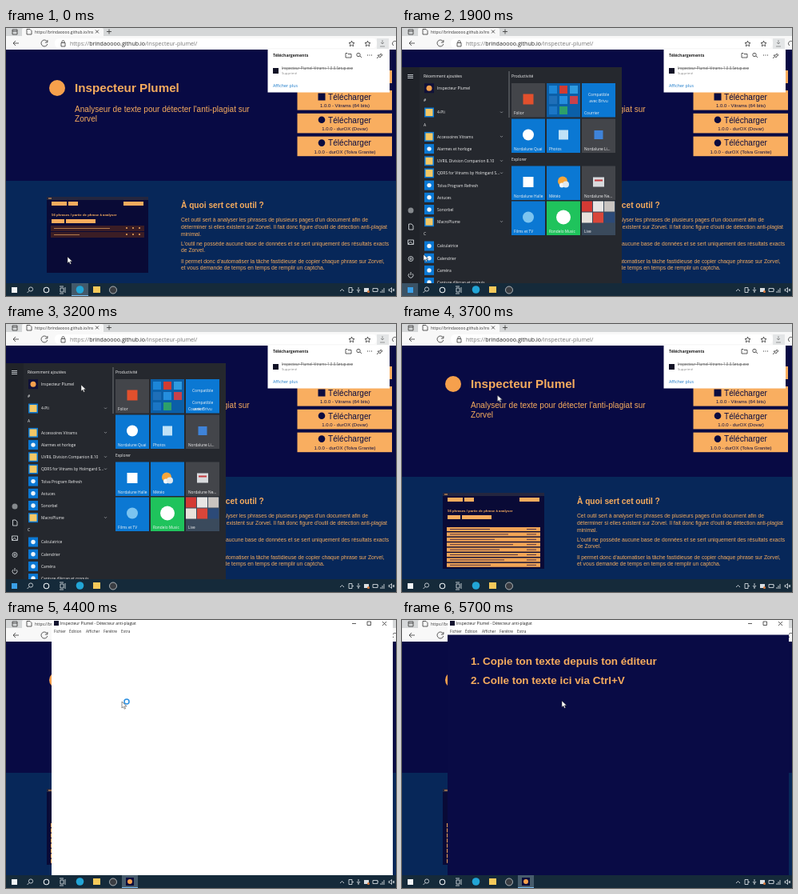
Animation, 488 px wide and 335 px high, one loop 5800 ms. Source, as an HTML page:

```html
<!DOCTYPE html>
<html lang="fr">
<head>
<meta charset="utf-8">
<title>Inspecteur Plumel</title>
<style>
html, body { margin: 0; width: 100%; height: 100%; overflow: hidden; background: #080a44; }
svg { display: block; width: 100vw; height: 100vh; }
text { font: 4.9px "Open Sans", "Noto Sans", sans-serif; white-space: pre; }
.web text { font-family: "Liberation Sans", Arial, sans-serif; fill: #f6ac5e; }
.web .dark { fill: #0b0c40; }
.bold { font-weight: 700; }
.line { fill: none; stroke: #333; stroke-width: .8; }
.pale { fill: none; stroke: #e8edf0; stroke-width: .8; }
.white text { fill: #f4f4f4; }

/* The small lead keeps each change just before its 100 ms tick. */
.anim { animation: 5800ms step-end -20ms infinite; }

#cursor { animation-name: move; }
@keyframes move {
  0%     { transform: translate(77px, 286px); }
  3.45%  { transform: translate(77px, 286px); animation-timing-function: steps(8); }
  17.24% { transform: translate(13px, 326px); }
  31.03% { transform: translate(13px, 326px); animation-timing-function: steps(6); }
  41.38% { transform: translate(96px, 68px); }
  43.1%  { transform: translate(96px, 68px); animation-timing-function: steps(6); }
  53.45% { transform: translate(94px, 76px); }
  58.62% { transform: translate(94px, 76px); animation-timing-function: steps(6); }
  68.97% { transform: translate(145px, 102px); }
  87.93% { transform: translate(145px, 102px); animation-timing-function: steps(5); }
  96.55%, 100% { transform: translate(200px, 101px); }
}

#menu { animation-name: menu; }
@keyframes menu {
  0%     { opacity: 0; transform: translateY(24px); }
  24.14% { opacity: 0; transform: translateY(24px); animation-timing-function: steps(3); }
  29.31% { opacity: 1; transform: none; }
  60.34% { opacity: 1; transform: none; animation-timing-function: steps(2); }
  63.79%, 100% { opacity: 0; transform: none; }
}

#app { animation-name: open; transform-origin: 270.5px 157px; }
@keyframes open {
  0%     { opacity: 0; transform: scale(.975); }
  72.41% { opacity: .53; transform: scale(.975); }
  74.14% { opacity: .85; transform: scale(.99); }
  75.86%, 100% { opacity: 1; transform: none; }
}

#startHover { animation-name: startHover; }
@keyframes startHover { 0% { opacity: 0 } 15.52% { opacity: 1 } 48.28%, 100% { opacity: 0 } }
#startBlue { animation-name: startBlue; }
@keyframes startBlue { 0% { opacity: 0 } 15.52% { opacity: 1 } 62.07%, 100% { opacity: 0 } }
#tabTask { animation-name: tabTask; }
@keyframes tabTask { 0% { opacity: 1 } 25.86%, 100% { opacity: 0 } }
#appTask { animation-name: appTask; }
@keyframes appTask { 0% { opacity: 0 } 74.14%, 100% { opacity: 1 } }
#rowHover { animation-name: rowHover; }
@keyframes rowHover { 0% { opacity: 0 } 39.66% { opacity: 1 } 48.28%, 100% { opacity: 0 } }
#busy { animation-name: busy; }
@keyframes busy { 0% { opacity: 0 } 65.52% { opacity: 1 } 77.59%, 100% { opacity: 0 } }
#demoRows { animation-name: demoRows; }
@keyframes demoRows { 0% { opacity: 0 } 34.48%, 100% { opacity: 1 } }
#body { animation-name: body; }
@keyframes body { 0% { opacity: 0 } 77.59%, 100% { opacity: 1 } }
#steps { animation-name: guide; }
@keyframes guide { 0% { opacity: 0 } 91.38%, 100% { opacity: 1 } }
#mailOld { animation-name: mailOld; }
@keyframes mailOld { 0% { opacity: 1 } 53.45% { opacity: 0 } 56.9%, 100% { opacity: 1 } }
#mailNew { animation-name: mailNew; }
@keyframes mailNew {
  0%     { opacity: 0; transform: translateY(30px); }
  53.45% { opacity: 1; transform: translateY(30px); }
  55.17% { opacity: 1; transform: translateY(15px); }
  56.9%, 100% { opacity: 0; transform: none; }
}
</style>
</head>
<body>
<svg viewBox="0 0 488 335" preserveAspectRatio="none">
  <defs>
    <clipPath id="mailClip"><path d="M225 69h42v42h-42z"/></clipPath>
    <path id="star" class="line" d="M0-3.500l1 2.400 2.500.2-1.900 1.700.6 2.500L0 2l-2.200 1.300.6-2.500-1.900-1.700 2.500-.2z"/>
  </defs>

  <!-- web page -->
  <g class="web">
    <path fill="#080a44" d="M0 27h488v164H0z"/>
    <path fill="#072759" d="M0 191h488v128H0z"/>
    <circle cx="64" cy="75" r="10" fill="#f6a04c"/>
    <text class="bold" x="86" y="80" style="font-size:15.2px">Inspecteur Plumel</text>
    <g id="intro"></g>
    <g id="buttons"></g>
    <text class="bold" x="219" y="225" style="font-size:10.17px">À quoi sert cet outil ?</text>
    <g id="about"></g>
    <g id="demo">
      <path fill="#090a36" d="M51 211h127v95H51z"/>
      <path fill="#24263f" d="M51 211h127v4H51z"/>
      <path fill="#f6ac5e" d="M53 212.5h4v1h-4zM57 217h19v5H57zM78 217h12v5H78zM147 217h25v5h-25zM57 239h16v5H57zM75 239h37v5H75z"/>
      <text class="bold" x="57" y="235.3" style="font-size:4.3px">56 phrases / partie de phrase à analyser</text>
      <path fill="#3b1d25" d="M56 247h117v7H56zM56 255h117v7H56z"/>
      <g id="demoLines"></g>
      <g id="demoRows" class="anim"></g>
    </g>
  </g>

  <!-- browser frame -->
  <path fill="#d5d7d8" d="M0 0h488v11H0z"/>
  <path fill="#f8f8f8" d="M20 11V2q0-2 2-2h98q2 0 2 2v9zM0 10h488v17H0z"/>
  <path fill="#fff" d="M66 13h393q5 0 5 6t-5 6H66q-5 0-5-6t5-6z"/>
  <path class="line" d="M8 2h6v6H8zM8 4h6M26 1.500h4l2 2V8h-6zM112 2.500l4 4m0-4l-4 4M126 4.500h6m-3-3v6"/>
  <path class="line" d="M16 19H9l3-3m-3 3l3 3M51.500 17a4 4 0 1 0 .4 3m0-5v3h-3M69 18.500h5V23h-5zM70 18v-1.500q1.500-2 3 0V18"/>
  <path class="line" d="M471 15v5m-2-2l2 2 2-2M468 23h6M485 22a3 3 0 1 1 3 0"/>
  <use href="#star" x="432.500" y="19.500"/>
  <use href="#star" x="452.500" y="19.500"/>
  <path fill="#cfd3d6" opacity=".5" d="M464 13h15v13h-15z"/>
  <text x="36" y="6.800" style="font-size:4.900px" fill="#333">https://brindaoooo.github.io/ins</text>
  <text x="80" y="21.600" style="font-size:7.100px" fill="#777">https://<tspan fill="#222">brindaoooo.github.io</tspan>/inspecteur-plumel/</text>

  <!-- downloads -->
  <path fill="#fff" d="M327.500 26.500h152.500v54h-152.500z"/>
  <text class="bold" x="334" y="36" style="font-size:5.200px" fill="#222">Téléchargements</text>
  <path class="line" d="M425 31.500h2l1 1h4v4.500h-7zM443 35l2 2M466 36l-2 2m1-4l3 3 1-2 2-1-2-2-1 2z"/>
  <circle class="line" cx="441" cy="33.500" r="2.200"/>
  <path fill="#333" d="M452 33.500h1v1h-1zM454.500 33.500h1v1h-1zM457 33.500h1v1h-1z"/>
  <path fill="#111226" d="M334 50h7v7h-7z"/>
  <text x="345" y="52" style="font-size:4.500px;text-decoration:line-through" fill="#555">Inspecteur-Plumel-Vitrams-1.0.0.Setup.exe</text>
  <text x="345" y="58" style="font-size:4.200px" fill="#888">Supprimé</text>
  <text x="334" y="74" style="font-size:5.300px" fill="#1878c8">Afficher plus</text>

  <!-- start menu -->
  <g id="menu" class="anim white">
    <path fill="#25282e" d="M0 49h275v270H0z"/>
    <path fill="#202329" d="M0 49h22v270H0z"/>
    <path id="rowHover" class="anim" fill="#4a4c50" d="M25 53h106v14H25z"/>
    <path class="pale" d="M7 58.500h7M7 60.500h7M7 62.500h7M8.500 245h3.500l2 2v5H8.500zM7.500 265h7v5.500h-7zM8 270l2.500-3 3 3"/>
    <circle cx="11" cy="228" r="3.500" fill="#85898d"/>
    <circle class="pale" cx="11" cy="288.500" r="3"/><circle class="pale" cx="11" cy="288.500" r="1"/>
    <path class="pale" d="M9 307a3 3 0 1 0 4 0M11 305v4"/>
    <path fill="#85898d" d="M133.600 54h.8v58h-.8z"/>
    <g id="items"></g>
    <text x="137" y="62">Productivité</text>
    <text x="137" y="166">Explorer</text>
    <g id="tiles"></g>
    <g clip-path="url(#mailClip)" text-anchor="middle">
      <text x="246" y="84.600">Compatible</text>
      <text id="mailOld" class="anim" x="246" y="92.600">avec Brivu</text>
      <g id="mailNew" class="anim"><text x="246" y="84.600">Compatible</text><text x="246" y="92.600">avec Brivu</text></g>
    </g>
  </g>

  <!-- application -->
  <g id="app" class="anim">
    <path fill="#fff" d="M57-1h427v320H57z"/>
    <path fill="#12132f" d="M60 1h6v6h-6z"/>
    <text x="68" y="6.300" fill="#222">Inspecteur Plumel - Détecteur anti-plagiat</text>
    <path class="line" d="M433 4.500h5M452 2h4.500v4.500h-4.500zM471 2l5 5m0-5l-5 5"/>
    <g id="bar"></g>
    <path id="body" class="anim" fill="#090b45" d="M57 18.500h427V319H57z"/>
    <g id="steps" class="anim web">
      <text class="bold" x="86" y="55.600" style="font-size:13.480px">1. Copie ton texte depuis ton éditeur</text>
      <text class="bold" x="86" y="80.200" style="font-size:13.480px">2. Colle ton texte ici via Ctrl+V</text>
    </g>
  </g>

  <!-- taskbar -->
  <path fill="#152a3a" d="M0 319h488v16H0z"/>
  <path id="startHover" class="anim" fill="#3a5265" d="M0 319h20v16H0z"/>
  <path fill="#f2f5f7" d="M7 324h7v7H7z"/>
  <path id="startBlue" class="anim" fill="#3aa0e8" d="M7 324h7v7H7z"/>
  <circle class="pale" cx="31" cy="326.500" r="2.600"/><path class="pale" d="M29 328.500l-2.500 2.500"/>
  <circle class="pale" cx="50.500" cy="327.500" r="3.200" style="stroke-width:1.100"/>
  <path class="pale" d="M68 325h4v5h-4zM74 324v7M67 323h5M67 332h5"/>
  <g id="tabTask" class="anim"><path fill="#42596a" d="M82 319h21v16H82z"/><path fill="#76b9ed" d="M82 334h21v1H82z"/></g>
  <circle cx="92.500" cy="327" r="4.800" fill="#22a5d6"/>
  <path fill="#f5c95a" d="M109 323h9v8h-9z"/>
  <circle cx="134" cy="327.500" r="4.500" fill="#3a3d42" stroke="#cfd3d6" stroke-width=".8"/>
  <g id="appTask" class="anim">
    <path fill="#475c6c" d="M145 319h20v16h-20z"/><path fill="#76b9ed" d="M145 334h20v1h-20z"/>
    <path fill="#0a0c3c" d="M150 322h10v10h-10z"/><circle cx="155" cy="327" r="3" fill="#f6a04c"/>
  </g>
  <path class="pale" d="M418 329l2.500-2.500 2.500 2.500M429 324.500h4v6h-4zM433 327.500h2M441 324v4M439 327q2 4 4 0M441 329v2M459 325.500h6v4h-6zM465 327h1M469 331v-2M471 331v-4M473 331v-6M479 326.500h1.500l2-2v6l-2-2H479zM484 326l2 3m0-3l-2 3"/>
  <path fill="#d8dde0" d="M448 325h6v5h-6z"/><circle cx="453.500" cy="329.500" r="1.500" fill="#e07a3a"/>

  <g id="cursor" class="anim">
    <circle id="busy" class="anim" cx="6" cy="0" r="3" fill="none" stroke="#2b8fe0" stroke-width="1.500"/>
    <path fill="#fff" stroke="#222" stroke-width=".5" d="M0 0v8l1.900-1.700 1.300 2.900 1.400-.6-1.300-2.800H6z"/>
  </g>
</svg>
<script>
const add = (id, markup) => document.getElementById(id).insertAdjacentHTML('beforeend', markup);
const text = (x, y, s, size = 4.9, extra = '') => `<text x="${x}" y="${y}" style="font-size:${size}px" ${extra}>${s}</text>`;
const rect = (x, y, w, h, fill) => `<rect x="${x}" y="${y}" width="${w}" height="${h}" fill="${fill}"/>`;
const dot = (x, y, r, fill) => `<circle cx="${x}" cy="${y}" r="${r}" fill="${fill}"/>`;

add('intro', text(86, 104.7, "Analyseur de texte pour détecter l'anti-plagiat sur", 10.09) + text(86, 116.6, 'Zorvel', 10.09));

[
  [242.2, 'Cet outil sert à analyser les phrases de plusieurs pages d\'un document afin de'],
  [251.2, 'déterminer si elles existent sur Zorvel. Il fait donc figure d\'outil de détection anti-plagiat'],
  [259.6, 'minimal.'],
  [272.2, 'L\'outil ne possède aucune base de données et se sert uniquement des résultats exacts'],
  [280, 'de Zorvel.'],
  [294.2, 'Il permet donc d\'automatiser la tâche fastidieuse de copier chaque phrase sur Zorvel,'],
  [302.4, 'et vous demande de temps en temps de remplir un captcha.']
].forEach(([y, s]) => add('about', text(219, y, s, 6.75)));

add('buttons', rect(365, 53, 118, 16, '#f9ae60'));
['Vitrams (64 bits)', 'durOX (Dovar)', 'durOX (Tolva Granite)'].forEach((os, i) => {
  const y = 78 + i * 28.8;
  const ink = '#0b0c40';
  add('buttons', rect(364.5, y, 118.5, 24.6, '#f9ae60') +
    (i ? dot(395, y + 8, 4.3, ink) : rect(390.5, y + 3.5, 9, 9, ink)) +
    text(403, y + 11.7, 'Télécharger', 10.1, 'class="dark"') +
    text(424, y + 21, '1.0.0 - ' + os, 6, 'class="dark" text-anchor="middle"'));
});

// demo picture
for (let i = 0; i < 2; i++) {
  const y = 250 + i * 8;
  add('demoLines', rect(60, y, 70 - i * 38, 1, '#b27a4c') + dot(151, y, 1, '#f6ac5e') + dot(159, y, 1, '#f6ac5e') + dot(167, y, 1, '#f6ac5e'));
}
add('demoRows', rect(56, 247, 117, 58, '#090a36'));
for (let i = 0; i < 8; i++) {
  const y = 254 + i * 6.4;
  add('demoRows', rect(56, y, 117, 5, '#f0a456') + rect(60, y + 2, 50 + (i * 23) % 40, 1, '#533345') + rect(156, y + 2, 12, 1, '#533345'));
}

// start menu list: label, icon colour, folder arrow
const blue = '#0b78d3', grey = '#43454a', yellow = '#f3c866';
[
  ['Récemment ajoutées'],
  ['Inspecteur Plumel', 'app'],
  ['#'],
  ['4-Pli', yellow, 1],
  ['A'],
  ['Accessoires Vitrams', yellow, 1],
  ['Alarmes et horloge', blue],
  ['UVRIL Division Companion 8.10', yellow, 1],
  ['QDRS for Vitrams by Holmgard S...', yellow, 1],
  ['Tolva Program Refresh', blue],
  ['Astuces', blue],
  ['Sonorbel', blue],
  ['MacroPlume', yellow, 1],
  ['C'],
  ['Calculatrice', blue],
  ['Calendrier', blue],
  ['Caméra', blue],
  ["Capture d'écran et croquis", blue]
].forEach(([label, fill, folder], i) => {
  const y = 60 + i * 15.18;
  let icon = '';
  if (fill === 'app') icon = rect(28, y - 6, 12, 12, '#101139') + dot(34, y, 3.5, '#f6a04c');
  else if (folder) icon = rect(28, y - 6, 12, 12, blue) + rect(29.5, y - 4.5, 9, 9, fill);
  else if (fill) icon = rect(28, y - 6, 12, 12, fill) + dot(34, y, 2.7, '#eef5fa');
  const arrow = folder ? `<path class="pale" opacity=".6" d="M123 ${y - 1}l1.500 1.500 1.500-1.500"/>` : '';
  add('items', icon + text(fill ? 44 : 27, y + 1.9, label) + arrow);
});

// start menu tiles
const sq = (s, fill) => (x, y) => rect(x + 21 - s / 2, y + 20 - s / 2, s, s, fill);
const disc = (r, fill) => (x, y) => dot(x + 21, y + 20, r, fill);
const minis = (x, y) => {
  const fills = ['#1c86d8', '#d23b32', '#2f9be0', '#1f6fb8', '#258ede', '#c8414b', '#1b76c5', '#2da06a'];
  return fills.map((f, i) => rect(x + 3 + i % 3 * 13, y + 3 + (i / 3 | 0) * 13, 10, 10, f)).join('');
};
const sun = (x, y) => dot(x + 20, y + 19, 6, '#f7a63a') +
  dot(x + 19, y + 24, 3, '#f3f6f8') + dot(x + 24, y + 23, 4, '#dfe8ee');
const collage = (x, y) => ['#d43a34', '#e8e6e4', '#c9c4c0', '#e9e2dc', '#d9463a', '#2c4a78'].map((f, i) =>
  rect(x + i % 3 * 14, y + (i / 3 | 0) * 14, 13, 13, f)).join('');
const news = (x, y) => rect(x + 14, y + 14, 14, 12, '#d8dadd') + rect(x + 16, y + 17, 10, 2, '#c63b3f');

[
  ['Folior', grey, sq(13, '#e2502d')],
  ['', '#0b5fa8', minis],
  ['Courrier', blue, () => ''],
  ['Nordalune Quai', blue, disc(7, '#fff')],
  ['Photos', blue, sq(12, '#bfe2f7')],
  ['Nordalune Li...', grey, sq(11, '#3f83d8')],
  ['Nordalune Halle', blue, sq(13, '#fff')],
  ['Météo', blue, sun],
  ['Nordalune Ne...', grey, news],
  ['Films et TV', blue, disc(7, '#7cc4f0')],
  ['Rondelo Music', '#1fc35c', disc(9, '#fff')],
  ['Live', '#3a4a5c', collage]
].forEach(([label, fill, icon], i) => {
  const x = 137 + i % 3 * 44;
  const y = [69, 113.5, 172.5, 216.5][i / 3 | 0];
  add('tiles', rect(x, y, 42, 42.5, fill) + icon(x, y) + text(x + 3, y + 39.4, label, 4.8));
});

['Fichier', 'Édition', 'Afficher', 'Fenêtre', 'Extra'].forEach((s, i) =>
  add('bar', text([60, 79, 100, 122, 144][i], 16, s, 4.8, 'fill="#333"')));
</script>
</body>
</html>
```
